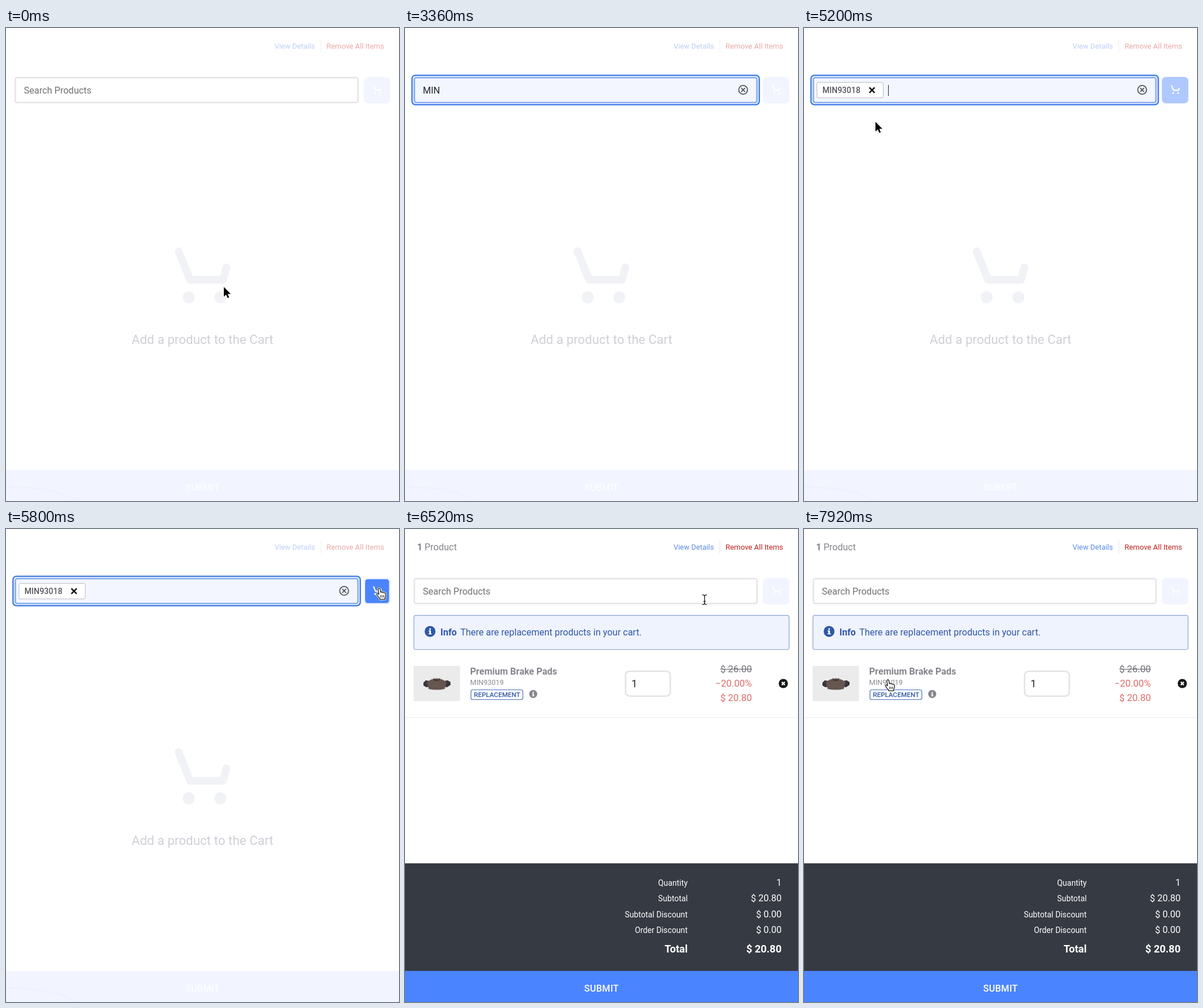
Write an HTML page with a canvas that moves like this. It is 682 by 822 pixels and loops after 8000 ms.

```html
<!DOCTYPE html>
<html lang="en">
<head>
<meta charset="utf-8">
<title>Cart</title>
<style>
html, body { margin: 0; width: 100%; height: 100%; overflow: hidden; background: #fff; }
canvas { display: block; width: 682px; height: 822px; }
</style>
</head>
<body>
<canvas id="stage"></canvas>
<script>
const W = 682, H = 822, LOOP = 8000, STEP = 40;
const canvas = document.getElementById('stage');
const g = canvas.getContext('2d');
const dpr = window.devicePixelRatio || 1;
canvas.width = W * dpr;
canvas.height = H * dpr;

const PALE = [242, 245, 255], BLUE = [75, 132, 255];
const NAVY = '#2f57a8', GREY = '#85868c', RED = '#dd6c6c', INK = '#222428';

const ramp = (t, a, b) => Math.min(1, Math.max(0, (t - a) / (b - a)));
const ease = p => p * p * (3 - 2 * p);
const mix = (a, b, p) => `rgb(${a.map((v, i) => Math.round(v + (b[i] - v) * p))})`;

function text(s, x, y, size, color, weight = 400, align = 'left') {
  g.font = `${weight} ${size}px Roboto, Arial, sans-serif`;
  g.textAlign = align;
  g.fillStyle = color;
  g.fillText(s, x, y);
}

function box(x, y, w, h, r, fill, stroke, lw = 1) {
  g.beginPath();
  g.roundRect(x, y, w, h, r);
  if (fill) { g.fillStyle = fill; g.fill(); }
  if (stroke) { g.strokeStyle = stroke; g.lineWidth = lw; g.stroke(); }
}

function rect(x, y, w, h, fill) {
  g.fillStyle = fill;
  g.fillRect(x, y, w, h);
}

function disc(x, y, r, fill) {
  g.beginPath();
  g.arc(x, y, r, 0, 7);
  g.fillStyle = fill;
  g.fill();
}

function cross(x, y, r, color, lw) {
  g.beginPath();
  g.moveTo(x - r, y - r); g.lineTo(x + r, y + r);
  g.moveTo(x + r, y - r); g.lineTo(x - r, y + r);
  g.strokeStyle = color;
  g.lineWidth = lw;
  g.stroke();
}

function infoIcon(x, y, r, color) {
  disc(x, y, r, color);
  const k = r / 9.5;
  rect(x - 1.3 * k, y - 5.5 * k, 2.8 * k, 2.6 * k, '#fff');
  rect(x - 2.6 * k, y - 1.6 * k, 4 * k, 1.6 * k, '#fff');
  rect(x - 1.3 * k, y - 1.6 * k, 2.8 * k, 6 * k, '#fff');
  rect(x - 2.8 * k, y + 3.6 * k, 5.8 * k, 1.6 * k, '#fff');
}

// Trolley glyph centred on x, y; about 96 units wide at scale 1
function trolley(x, y, k, color) {
  g.save();
  g.translate(x, y);
  g.scale(k, k);
  g.lineCap = g.lineJoin = 'round';
  g.lineWidth = 13.5;
  g.strokeStyle = color;
  g.stroke(new Path2D('M-41.5-42L-21.5 7.5H35.5L41.5-14'));
  disc(-24, 38, 10.5, color);
  disc(31, 38, 10.5, color);
  g.restore();
}

const shapes = {
  arrow: new Path2D('M0 0V17L4 13.3L6.6 19.3L9.2 18.2L6.7 12.3H12Z'),
  beam: new Path2D('M-4-8.5Q0-8.5 0-6Q0-8.5 4-8.5M0-6V6M-4 8.5Q0 8.5 0 6Q0 8.5 4 8.5M-2 3H2'),
  hand: new Path2D('M-2.2 2C-2.2-.6 1-.8 1.4 1.8L2.2 7C2.6 5.6 5 5.8 5.2 7.4C5.8 6.4 7.8 6.8 8.1 8.2' +
    'C9 7.4 10.8 8 11 9.8C11.4 13 10.6 14.5 9.8 16.5L9.6 19.2H.8L.4 17.5C-1.5 15.5-3.8 12.5-4.6 10.8' +
    'C-5.2 9-3 8.2-1.8 9.6L-1 10.6Z'),
  creases: new Path2D('M2.4 12V16M5 12V16M7.6 12V16')
};

function outline(path, color, lw) {
  g.strokeStyle = color;
  g.lineWidth = lw;
  g.stroke(path);
}

function drawCursor(kind, x, y) {
  g.save();
  g.translate(x, y);
  g.lineJoin = 'round';
  if (kind === 'beam') {
    outline(shapes.beam, '#fff', 3);
    outline(shapes.beam, '#111', 1.3);
  } else if (kind === 'hand') {
    outline(shapes.hand, '#fff', 3);
    g.fillStyle = '#fff';
    g.fill(shapes.hand);
    outline(shapes.hand, '#111', 1.3);
    outline(shapes.creases, '#111', 1);
  } else {
    outline(shapes.arrow, '#fff', 2.4);
    g.fillStyle = '#000';
    g.fill(shapes.arrow);
    if (kind === 'blocked') {
      const sign = new Path2D();
      sign.arc(9.5, 26, 8.5, 0, 7);
      sign.moveTo(3.5, 20);
      sign.lineTo(15.5, 32);
      disc(9.5, 26, 8.5, '#f4f4f6');
      outline(sign, '#fff', 5);
      outline(sign, '#9b9ca1', 2.6);
    }
  }
  g.restore();
}

// Each run: key points as [time, x, y]; the pointer is hidden between runs
const runs = [
  [[0, 378, 450], [120, -57, 369]],
  [[840, 16, 157], [1120, 51, 126], [1600, 51, 126], [1640, 47, 115], [2400, 47, 115]],
  [[4520, 47, 115], [4840, 124, 163], [5360, 124, 163], [5760, 648, 103], [5960, 648, 103],
   [6160, 651, 98], [6280, 651, 98], [6960, 192, 185], [7200, 192, 185], [7480, 575, 255],
   [7720, 41, 281], [7920, 146, 262], [8000, 146, 262]]
];

function pointer(t) {
  const run = runs.find(r => t >= r[0][0] && t <= r[r.length - 1][0]);
  if (!run) return null;
  const i = Math.max(1, run.findIndex(k => k[0] >= t));
  const [a, b] = [run[i - 1], run[i]];
  const p = ramp(t, a[0], b[0]), q = t < 160 ? p : ease(p);
  return [a[1] + (b[1] - a[1]) * q, a[2] + (b[2] - a[2]) * q];
}

function pointerKind(x, y, t) {
  const over = (l, r, top, bottom) => x > l && x < r && y > top && y < bottom;
  if (over(621, 667, 85, 131)) return t < 6040 ? 'hand' : 'blocked';
  if (over(15, 612, 85, 131)) return 'beam';
  if (t >= 4520 && t < 5120 && y > 142) return 'hand';
  if (t >= 6280) {
    if (over(62, 411, 150, 210)) return 'beam';
    if (over(114, 265, 238, 300)) return 'hand';
  }
  return 'arrow';
}

const keys = [2440, 2680, 2840, 3440, 3520, 3640, 3800, 4040];
const CODE = 'MIN93018';

function searchField(t) {
  const focus = t < 6000 ? ramp(t, 1640, 1880) : 0;
  const typed = CODE.slice(0, keys.filter(k => k <= t).length);
  const tagged = t >= 5120 && t < 6000;
  if (focus) {
    g.globalAlpha = focus;
    box(12.2, 82.2, 602.6, 51.1, 6, '#fff', '#4a82e6', 2.6);
    g.globalAlpha = 1;
  }
  box(16.2, 86.2, 594.6, 43.3, 3.5, mix([255, 255, 255], [243, 246, 255], focus),
    mix([229, 229, 232], [134, 172, 240], focus), 2.6);

  if (t >= 2440 && t < 6000) {
    g.beginPath();
    g.arc(586.8, 107.5, 7.6, 0, 7);
    g.strokeStyle = '#55565c';
    g.lineWidth = 1.8;
    g.stroke();
    cross(586.8, 107.5, 3.3, '#55565c', 1.8);
  }
  let caret = 31;
  if (tagged) {
    box(22.5, 94.5, 115, 27, 2.5, '#fff', '#bdbec5');
    text(CODE, 32, 113, 14, '#55565c', 500);
    cross(118, 108, 4.6, '#111', 2.6);
    caret = 146;
  } else if (typed && t < 5120) {
    text(typed, 31, 113.5, 16, INK);
    caret += g.measureText(typed).width;
  } else {
    text('Search Products', 31, 113.8, 16, '#707173');
  }
  const last = [1680, ...keys, 5120].filter(k => k <= t).pop();
  if (focus && (t - last) % 1040 < 520) rect(Math.round(caret), 99, 1, 19, '#222');
}

function dropdown(t) {
  if (t < 4520 || t >= 5160) return;
  g.save();
  g.globalAlpha = t < 5120 ? ramp(t, 4480, 4640) : 0.4;
  g.shadowColor = 'rgba(0,0,0,.25)';
  g.shadowBlur = 4 * dpr;
  g.shadowOffsetY = dpr;
  box(15, 137, 592.5, 68, 3, '#fff');
  g.shadowColor = 'transparent';
  rect(15, 142, 592.5, 37, '#f3f6ff');
  text(CODE, 32.5, 166.8, 16.5, INK);
  text('Brake Pads', 196.5, 166.8, 16.5, INK);
  g.restore();
}

function cartButton(t) {
  let on = ramp(t, 5120, 5320);
  if (t >= 5960) on = 1 - 0.7 * ramp(t, 5960, 6160);
  if (t >= 6280) on = 0.3 * (1 - ramp(t, 6280, 6480));
  box(621, 85, 46, 46, 7, mix(PALE, BLUE, on));
  const rim = ramp(t, 5640, 5760) * (1 - ramp(t, 5960, 6080));
  if (rim) {
    g.globalAlpha = rim;
    box(622, 86, 44, 44, 6, null, '#eef3ff', 2.4);
    g.globalAlpha = 1;
  }
  trolley(644.5, 107, 0.155, '#fff');
}

function brakePad() {
  rect(15, 238, 80.5, 61, '#ebebeb');
  g.fillStyle = '#38373a';
  g.fill(new Path2D('M32 267L36 263L42 264V274L37 275L32 272ZM79 266L74 263L68 264V274L73 275L79 271Z'));
  g.fillStyle = '#65564f';
  g.fill(new Path2D('M38 266Q55 253 72 266L69 278Q55 281 41 278Z'));
  g.fillStyle = '#3b3638';
  g.fill(new Path2D('M49 258L52 262H58L61 258L59 264H51Z'));
}

function cartContents() {
  text('1', 21, 37, 16, GREY, 700);
  text('Product', 34, 37, 16, GREY);

  box(15.5, 150.2, 651, 59.3, 3.5, '#eff3fd', '#86a4dc', 1.2);
  infoIcon(43.5, 178, 9.4, NAVY);
  text('Info', 61.5, 185, 16, NAVY, 700);
  text('There are replacement products in your cart.', 96, 185, 16, NAVY);

  brakePad();
  text('Premium Brake Pads', 113, 253, 16, GREY, 700);
  text('MIN93019', 113, 270.6, 12.5, '#8b8c92');
  box(114.5, 279.5, 90, 17, 3, '#fff', '#4a72bd', 1.2);
  text('REPLACEMENT', 159.7, 291.8, 11.5, NAVY, 500, 'center');
  infoIcon(222.5, 286.8, 7, GREY);

  box(382.8, 247.3, 77.6, 43.2, 7, '#fff', '#e2e3e7', 2.6);
  text('1', 393, 275, 18, INK);

  text('$ 26.00', 602, 249.2, 16.5, '#70717a', 400, 'right');
  rect(547, 243, 55, 1.2, '#70717a');
  text('−20.00%', 602, 274, 16.6, RED, 400, 'right');
  text('$ 20.80', 602, 298.7, 16.5, RED, 400, 'right');
  disc(656.5, 268.5, 8, '#17181b');
  cross(656.5, 268.5, 2.6, '#fff', 2.2);
  rect(0, 327, W, 1, '#ebecee');

  rect(0, 581, W, 187, '#363a42');
  const rows = [['Quantity', '1'], ['Subtotal', '$ 20.80'],
    ['Subtotal Discount', '$ 0.00'], ['Order Discount', '$ 0.00']];
  rows.forEach(([label, value], i) => {
    const y = 619.8 + i * 27.5;
    text(label, 490.5, y, 13.8, '#fff', 400, 'right');
    text(value, 653.5, y, 16, '#fff', 400, 'right');
  });
  text('Total', 490.5, 736, 18, '#fff', 700, 'right');
  text('$ 20.80', 653.5, 736, 18, '#fff', 700, 'right');
}

function emptyCart() {
  trolley(341, 430, 1, '#f1f2f6');
  text('Add a product to the Cart', 341, 549, 22, '#cfcfd7', 400, 'center');
}

function submitBar(t, filled) {
  rect(0, 768, W, 54, mix(PALE, BLUE, filled ? ramp(t, 6240, 6520) : 0));
  if (!filled) {
    g.beginPath();
    g.ellipse(10, 838, 122, 40, 0, 0, 7);
    g.strokeStyle = '#eef1fc';
    g.lineWidth = 2;
    g.stroke();
  }
  g.letterSpacing = '0.3px';
  text('SUBMIT', 341, 804, 16, filled && t < 6320 ? '#f2f5ff' : '#fff', filled ? 500 : 400, 'center');
  g.letterSpacing = '0px';
}

function draw(t) {
  const filled = t >= 6280;
  g.setTransform(dpr, 0, 0, dpr, 0, 0);
  g.lineCap = 'butt';
  g.lineJoin = 'miter';
  rect(0, 0, W, H, '#fff');
  text('View Details', 466, 36.4, 12.8, filled ? '#5a8aea' : '#bccef8');
  text('Remove All Items', 556.3, 36.4, 12.9, filled ? '#c0211f' : '#eaa9a6');
  rect(546, 20, 1, 23, filled ? '#e4e5ea' : '#f0f0f4');
  if (filled) cartContents();
  else emptyCart();
  g.lineCap = 'butt';
  searchField(t);
  cartButton(t);
  dropdown(t);
  submitBar(t, filled);
  const at = pointer(t);
  if (at) {
    g.lineCap = 'butt';
    drawCursor(pointerKind(at[0], at[1], t), at[0], at[1]);
  }
}

const start = performance.now();
function tick() {
  const t = (performance.now() - start) % LOOP;
  draw(Math.floor(t / STEP) * STEP);
  requestAnimationFrame(tick);
}
tick();
</script>
</body>
</html>
```
